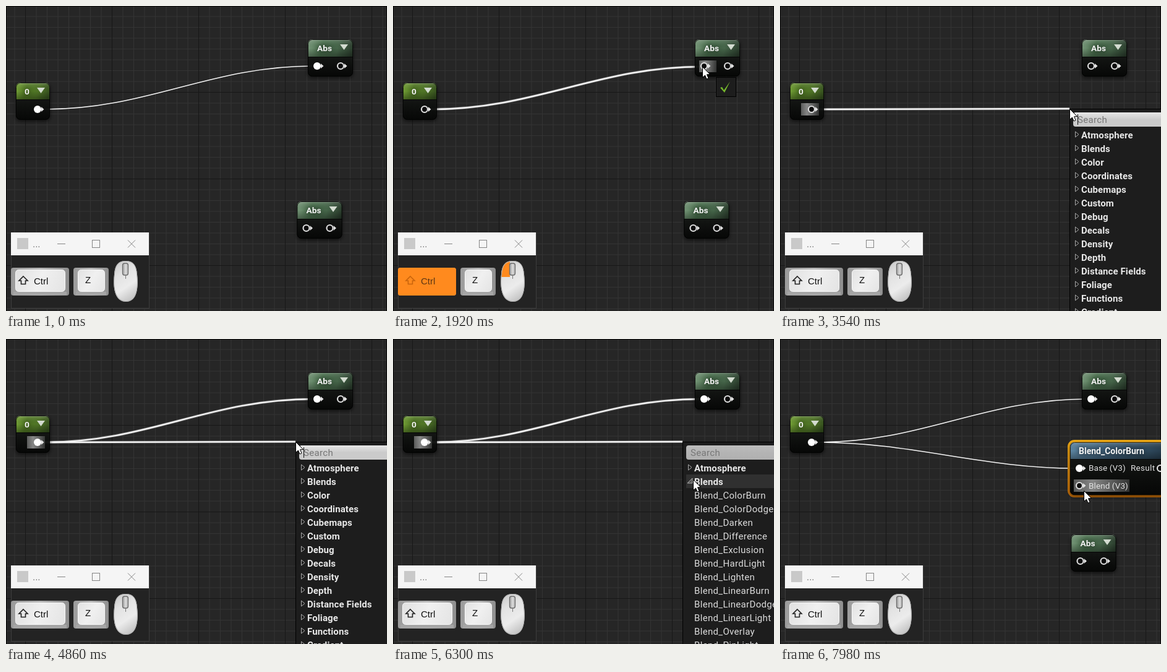
These frames come from a looping animation (616x493 px, 8 s). An HTML page with a canvas:

```html
<!DOCTYPE html>
<html lang="en">
<head>
<meta charset="utf-8">
<title>Node graph</title>
<style>
html, body { margin: 0; width: 100%; height: 100%; overflow: hidden; background: #262626; }
canvas { display: block; }
</style>
</head>
<body>
<canvas id="stage" width="616" height="493"></canvas>
<script>
const W = 616, H = 493, LOOP = 8000, STEP = 60;
const c = document.getElementById('stage').getContext('2d');
const OUT = [62, 167], ORANGE = '#ff8a1e';

// cursor path: time, x, y
const PATH = [
  [120, 632, 122], [180, 612, 119], [480, 562, 86], [840, 500, 98], [1920, 500, 98],
  [2340, 446, 161], [2520, 446, 161], [2820, 468, 166], [5280, 468, 166],
  [5700, 488, 242], [6000, 485, 227], [6780, 485, 227], [7140, 491, 245], [8000, 491, 245]
];
const GROUPS = ['Atmosphere', 'Blends', 'Color', 'Coordinates', 'Cubemaps', 'Custom', 'Debug',
  'Decals', 'Density', 'Depth', 'Distance Fields', 'Foliage', 'Functions', 'Gradient'];
const BLENDS = ['ColorBurn', 'ColorDodge', 'Darken', 'Difference', 'Exclusion', 'HardLight',
  'Lighten', 'LinearBurn', 'LinearDodge', 'LinearLight', 'Overlay', 'PinLight'];

const within = (t, a, b) => t >= a && t < b;

function cursorAt(t) {
  if (t <= PATH[0][0]) return [PATH[0][1], PATH[0][2]];
  const i = PATH.findIndex(k => k[0] >= t);
  const a = PATH[i - 1], b = PATH[i];
  const u = (t - a[0]) / (b[0] - a[0]), e = u * u * (3 - 2 * u);
  return [a[1] + (b[1] - a[1]) * e, a[2] + (b[2] - a[2]) * e];
}

function rect(x, y, w, h, fill) {
  c.fillStyle = fill;
  c.fillRect(x, y, w, h);
}

function round(x, y, w, h, r, fill, stroke) {
  c.beginPath();
  c.roundRect(x, y, w, h, r);
  if (fill) { c.fillStyle = fill; c.fill(); }
  if (stroke) { c.strokeStyle = stroke; c.stroke(); }
}

function poly(points, fill, stroke) {
  c.beginPath();
  for (let i = 0; i < points.length; i += 2) c.lineTo(points[i], points[i + 1]);
  c.closePath();
  if (fill) { c.fillStyle = fill; c.fill(); }
  if (stroke) { c.strokeStyle = stroke; c.stroke(); }
}

function text(s, x, y, font, fill, spacing = 0) {
  c.font = font;
  c.letterSpacing = spacing + 'px';
  c.fillStyle = fill;
  c.fillText(s, x, y);
}

const bold = size => `bold ${size}px Roboto, sans-serif`;
const plain = size => `${size}px Roboto, sans-serif`;

function ramp(x0, y0, x1, y1, ...stops) {
  const g = c.createLinearGradient(x0, y0, x1, y1);
  stops.forEach((s, i) => g.addColorStop(i / (stops.length - 1), s));
  return g;
}

function grid() {
  rect(0, 0, W, H, '#262626');
  for (const major of [false, true]) {
    for (let i = -8; i < 35; i++) {
      if ((i % 8 === 0) !== major) continue;
      const color = major ? '#171717' : '#343434';
      rect(31 + i * 17.5, 0, 1, H, color);
      rect(0, 139 + i * 17.5, W, 1, color);
    }
  }
  c.lineWidth = 1;
  c.strokeStyle = '#060606';
  c.strokeRect(.5, .5, W - 1, H);
}

function wire([x0, y0], [x1, y1], thick) {
  const d = (Math.abs(x1 - x0) + Math.abs(y1 - y0)) / 3;
  c.beginPath();
  c.moveTo(x0, y0);
  c.bezierCurveTo(x0 + d, y0, x1 - d, y1, x1, y1);
  if (thick) {
    c.lineWidth = 4;
    c.strokeStyle = 'rgba(255,255,255,.3)';
    c.stroke();
  }
  c.lineWidth = thick ? 2.4 : 1.4;
  c.strokeStyle = '#f4f4f4';
  c.stroke();
}

function pin(x, y, full) {
  poly([x + 6, y - 4, x + 10.5, y, x + 6, y + 4], '#e4e4e4');
  c.beginPath();
  c.arc(x, y, full ? 6 : 5, 0, 7);
  c.fillStyle = full ? '#fff' : '#0c0c0c';
  c.fill();
  c.lineWidth = 2.2;
  c.strokeStyle = '#dedede';
  if (!full) c.stroke();
}

function glow(x, y, w, h) {
  rect(x, y, w, h, ramp(x, 0, x + w, 0, 'rgba(255,255,255,.32)', 'rgba(255,255,255,.5)',
    'rgba(255,255,255,.34)', 'rgba(255,255,255,.16)'));
}

function box(x, y, w, h, head, tones) {
  c.save();
  c.shadowColor = 'rgba(0,0,0,.75)';
  c.shadowBlur = 6;
  c.shadowOffsetY = 2;
  round(x, y, w, h, 7, 'rgba(9,10,9,.86)');
  c.restore();
  c.save();
  c.beginPath();
  c.roundRect(x, y, w, h, 7);
  c.clip();
  rect(x, y, w, head, ramp(x, y, x + w, y + head * .6, ...tones));
  rect(x, y, w, head, ramp(0, y, 0, y + head, 'rgba(255,255,255,.16)', 'rgba(0,0,0,0)', 'rgba(0,0,0,.32)'));
  rect(x, y, w, 1.5, 'rgba(255,255,255,.3)');
  rect(x, y + head, w, 1, '#050505');
  rect(x, y + head + 1, w, h - head, ramp(0, y + head, 0, y + h, 'rgba(40,44,40,.35)', 'rgba(0,0,0,.3)'));
  c.restore();
  c.lineWidth = 1;
  round(x + .5, y + .5, w - 1, h - 1, 7, null, 'rgba(0,0,0,.8)');
}

function title(s, x, y, size = 14) {
  c.save();
  c.shadowColor = 'rgba(0,0,0,.9)';
  c.shadowBlur = 8;
  text(s, x, y, bold(size), '#f2f2f2');
  c.restore();
}

function arrowDown(x, y) {
  poly([x, y, x + 13, y, x + 6.5, y + 9], '#d3dbd0');
}

function abs(dx, dy, full, hover) {
  c.save();
  c.translate(dx, dy);
  box(488, 54, 73, 60, 28, ['#7d9c7f', '#4c7450', '#46664a', '#2b3d2d']);
  title('Abs', 503, 73, 13.7);
  arrowDown(540, 62);
  if (hover) glow(495, 88, 28, 19);
  pin(503, 97, full);
  pin(541, 97);
  c.restore();
}

function constant(full, hover) {
  box(16, 124, 55, 60, 27, ['#79a63a', '#547d25', '#4f7426', '#36511f']);
  title('0', 30, 143, 13.7);
  arrowDown(50, 132);
  if (hover) glow(34, 157, 29, 20);
  pin(51, 167, full);
}

function colorBurn(hover) {
  c.lineWidth = 4;
  round(467, 165, 190, 89, 9, null, ramp(0, 163, 0, 256, '#f3ae16', '#dd8d10', '#c46c08'));
  box(469, 167, 186, 85, 27, ['#5d86a3', '#41647f', '#2f4a5e', '#1b2a36']);
  title('Blend_ColorBurn', 483, 186);
  if (hover) glow(475, 227, 90, 20);
  pin(484, 209, true);
  pin(484, 237);
  pin(615, 209);
  text('Base (V3)', 499, 213, plain(13.5), '#e2e2e2', .1);
  text('Blend (V3)', 499, 242, plain(13.5), '#e2e2e2', .1);
  text('Result', 567, 213, plain(13.5), '#e2e2e2', .3);
}

function panel(x, y, w, h) {
  rect(x, y, w, h, '#000');
  rect(x + 1, y + 1, w - 2, h - 2, '#1d1d1d');
}

function placeTip(x, y) {
  panel(x, y, 190, 32);
  round(x + 15, y + 7, 18, 18, 3, '#cfcfcf');
  rect(x + 15, y + 11, 18, 1, '#777');
  text('Place a new node.', x + 38, y + 21, plain(15), '#d8d8d8', .35);
}

function checkTip(x, y) {
  panel(x, y, 33, 32);
  poly([x + 7, y + 17, x + 10, y + 16, x + 13, y + 21, x + 23, y + 7, x + 14, y + 25], '#76b82c');
}

function menu(t, cy) {
  panel(468, 166, 200, 400);
  round(474, 172, 160, 23, 4, t < 5340
    ? ramp(0, 172, 0, 195, '#e6e6e6', '#cbcbcb', '#cbcbcb')
    : ramp(0, 172, 0, 195, '#bdbdbd', '#b4b4b4', '#b0b0b0'));
  text('Search', 481, 189, plain(15), '#777', .35);
  if (within(t, 3540, 5340)) rect(481, 175, 1, 17, '#111');

  const open = t >= 6300;
  const hot = Math.floor((cy - 198) / 22);
  if (hot >= 0) rect(474, 197 + hot * 22, 160, 22, '#303030');
  const rows = open ? [...GROUPS.slice(0, 2), ...BLENDS.map(s => 'Blend_' + s)] : GROUPS;
  c.lineWidth = 1;
  rows.forEach((s, i) => {
    const y = 208 + i * 22;
    const leaf = open && i > 1;
    text(s, 487, y + 6, leaf ? plain(15) : bold(15), leaf ? '#dcdcdc' : '#e8e8e8', leaf ? .32 : .1);
    if (leaf) return;
    if (open && i === 1) poly([484, y - 5, 484, y + 3, 476, y + 3], '#555', '#aaa');
    else poly([477.5, y - 5, 483, y - .5, 477.5, y + 4], null, '#a8a8a8');
  });
}

function key(x, w, label, on) {
  round(x, 423, w, 45, 4, ramp(x, 0, x + w, 0, '#9a9a9a', '#b8b8b8', '#8e8e8e'));
  rect(x + 4, 462, w - 8, 5, '#a6a6a6');
  c.lineWidth = 1;
  round(x + 7.5, 426.5, w - 14, 35, 5, ramp(x, 426, x + w, 462, '#dedede', '#f0f0f0', '#e2e2e2'), '#f8f8f8');
  if (on) round(x, 423, w, 45, 4, ORANGE);
  const shift = label === 'Ctrl';
  text(label, x + (shift ? 37 : 19), shift ? 450 : 448, '15px "Liberation Sans", Arial, sans-serif', on ? '#5f3714' : '#111');
  if (!shift) return;
  c.lineWidth = 1.6;
  poly([28, 437, 35, 444, 31.5, 444, 31.5, 449.5, 24.5, 449.5, 24.5, 444, 21, 444], null, on ? '#c9640c' : '#222');
}

function mouse(on) {
  c.save();
  c.beginPath();
  c.moveTo(193.5, 412);
  c.bezierCurveTo(206, 412, 211, 419, 212, 434);
  c.bezierCurveTo(215, 462, 209, 478, 194, 478);
  c.bezierCurveTo(179, 478, 172, 462, 175, 434);
  c.bezierCurveTo(176, 419, 181, 412, 193.5, 412);
  c.fillStyle = ramp(174, 412, 213, 470, '#c6c6c6', '#e2e2e2', '#ececec', '#c0c0c0');
  c.fill();
  c.clip();
  if (on) rect(174, 411, 15, 27, ORANGE);
  c.lineWidth = 2;
  c.strokeStyle = '#b4b4b4';
  c.stroke();
  c.restore();
  c.lineWidth = 1.3;
  round(188.5, 416, 9, 19, 3, ramp(189, 0, 198, 0, '#a5a5a5', '#dadada', '#aaa'), '#6c6c6c');
  rect(193, 435, 1, 6, '#777');
}

function keyWindow(ctrl, z, click) {
  rect(8, 366, 224, 123, '#3d3d3d');
  rect(9, 403, 222, 85, '#232323');
  rect(8, 366, 223, 37, '#f5f5f5');
  rect(18, 375, 18, 18, '#c9c9c9');
  text('...', 43, 390, '15px "Liberation Sans", Arial, sans-serif', '#777');
  c.lineWidth = 1;
  c.strokeStyle = '#858585';
  c.strokeRect(139.5, 378.5, 12, 12);
  c.beginPath();
  c.moveTo(83, 384.5); c.lineTo(96, 384.5);
  c.moveTo(197, 378.5); c.lineTo(209, 390.5);
  c.moveTo(209, 378.5); c.lineTo(197, 390.5);
  c.stroke();
  key(8, 94, 'Ctrl', ctrl);
  key(109, 57, 'Z', z);
  mouse(click);
}

function pointer(x, y) {
  c.lineWidth = 1;
  c.save();
  c.translate(Math.round(x) + .5, Math.round(y) + .5);
  poly([0, 0, 0, 17, 4, 13.5, 6.5, 19.5, 9.5, 18.2, 7, 12.3, 12, 12], '#fff', '#000');
  c.restore();
}

function draw(t) {
  const [x, y] = cursorAt(t);
  const linked = t < 1740 || t >= 4680;
  const placed = t >= 7680;
  const thick = within(t, 1740, 7860);
  const menuOpen = within(t, 3120, 7680);

  grid();
  if (linked) wire(OUT, [497, 97], thick);
  if (within(t, 1740, 3120)) wire(OUT, [x, y], true);
  if (menuOpen) wire(OUT, [468, 166], true);
  if (placed) wire(OUT, [478, 209], thick);

  constant(linked, within(t, 3180, 7860));
  abs(0, 0, linked, within(t, 1020, 1980));
  abs(-17.5, 262);
  if (placed) colorBurn(t >= 7920);
  keyWindow(
    within(t, 1200, 3480) || within(t, 4080, 4860),
    within(t, 4560, 4800),
    within(t, 1380, 3060) || within(t, 6180, 6300) || within(t, 7560, 7680)
  );
  if (menuOpen) menu(t, y);

  if (within(t, 1740, 1980)) checkTip(522, 115);
  else if (within(t, 1500, 3120)) placeTip(Math.round(x) + 16, Math.round(y) + 17);
  if (within(t, 7320, 7680)) {
    c.globalAlpha = t < 7380 ? .5 : 1;
    panel(503, 262, 160, 33);
    text('Blend_ColorBurn', 512, 283, plain(13.5), '#d4d4d4', .1);
    c.globalAlpha = 1;
  }
  pointer(x, y);
}

let start;
function frame(now) {
  start ??= now;
  const t = (now - start) % LOOP;
  draw(Math.floor(t / STEP) * STEP);
  requestAnimationFrame(frame);
}
draw(0);
requestAnimationFrame(frame);
</script>
</body>
</html>
```
